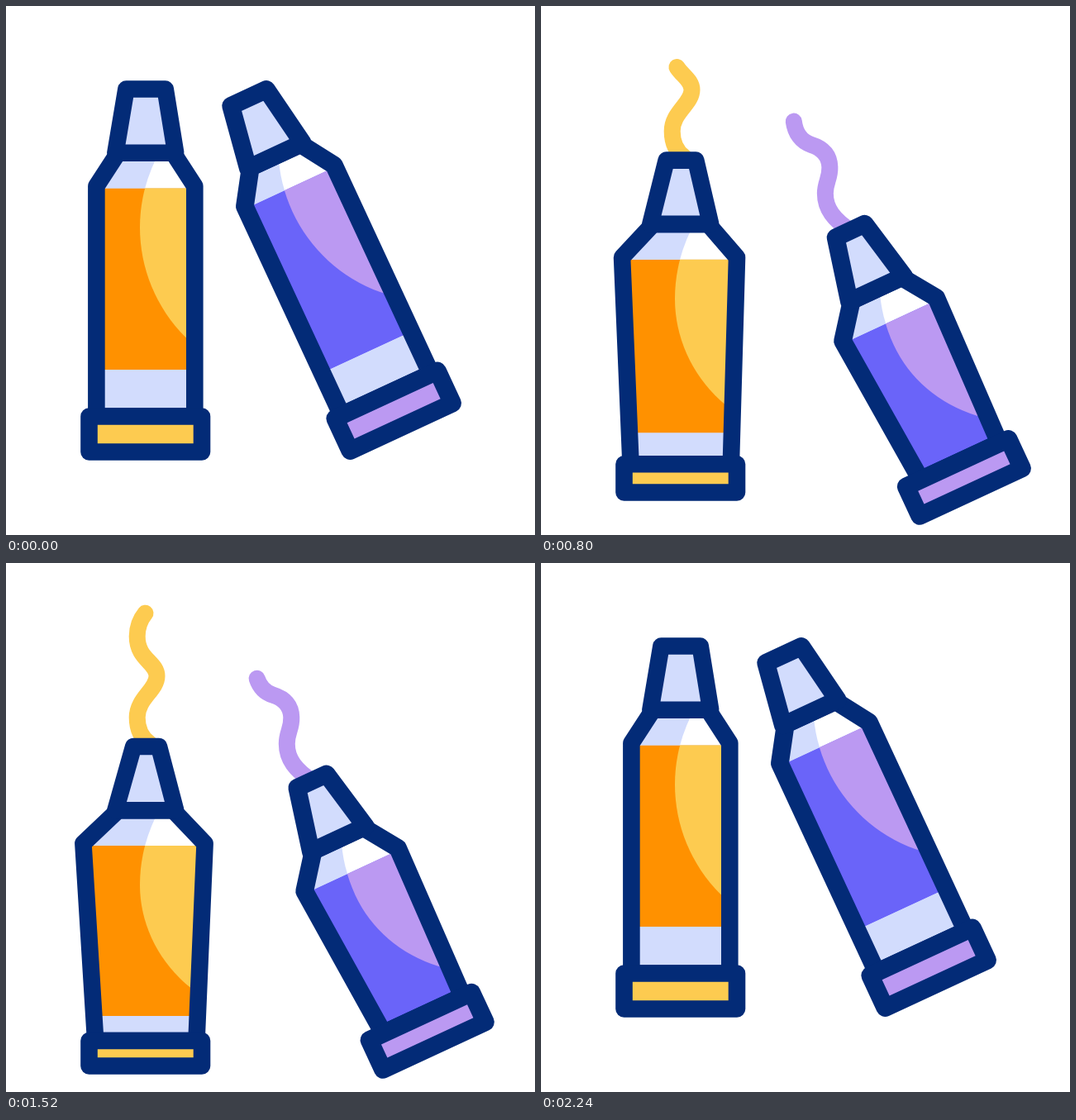
Write an HTML page with a canvas that moves like this. It is 640 by 640 pixels and loops after 2.4 s.

```html
<!DOCTYPE html>
<html lang="en">
<head>
<meta charset="utf-8">
<title>Paint tubes</title>
<style>
  html, body { margin: 0; width: 100%; height: 100%; overflow: hidden; background: #fff; }
  canvas { display: block; }
</style>
</head>
<body>
<canvas id="stage" width="640" height="640"></canvas>
<script>
const ctx = document.getElementById('stage').getContext('2d');
const LOOP = 2400;
const NAVY = '#032b77', PALE = '#d2dcfd';

// Offsets are the full travel of each part when the tube is squeezed.
const tubes = [
  {
    x: 169, y: 111, angle: 0, side: 0, line: 20.6,
    base: '#ff9100', light: '#fdcb50',
    rise: [390, 795], fall: [1612, 615],
    nozzle: 121.5, label: 108, footTop: 81.5, footBottom: 69,
    capTop: [8.8, -7.7], bodyTop: [-16, 12.3], bodyEnd: [-1.2, 2.2],
    shine: [349, 268, 187],
    thread: 'M5,7 C-5,0 -10.3,-11 -10.3,-25 C-10.3,-48 13.5,-58 13.5,-75 ' +
      'C13.5,-92 -10.3,-95 -10.3,-123 C-10.3,-134 -7,-143 -.5,-151'
  },
  {
    x: 298, y: 120.5, angle: -24.9 * Math.PI / 180, side: 5, line: 21.8,
    base: '#6a64f9', light: '#bb99f2',
    rise: [210, 750], fall: [1405, 615],
    nozzle: 187.5, label: 153, footTop: 97, footBottom: 93,
    capTop: [5, -4], bodyTop: [-4.5, 1.5], bodyEnd: [11, -3.5],
    shine: [346, 248, 187],
    thread: 'M6.5,10 C-15.5,-4 -25.5,-18 -25.5,-36 C-25.5,-50 -19.5,-54 -20,-68 ' +
      'C-20.5,-83 -29.5,-91 -42.5,-95 C-55.5,-99 -64,-112 -64,-130'
  }
];

for (const tube of tubes) {
  const path = document.createElementNS('http://www.w3.org/2000/svg', 'path');
  path.setAttribute('d', tube.thread);
  tube.length = path.getTotalLength();
  tube.path = new Path2D(tube.thread);
}

// Cubic bezier easing (.42, 0, .33, 1)
function ease(x) {
  if (x <= 0) return 0;
  if (x >= 1) return 1;
  let lo = 0, hi = 1;
  for (let i = 0; i < 24; i++) {
    const s = (lo + hi) / 2;
    if (1.26 * s * (1 - s) ** 2 + s * s < x) lo = s; else hi = s;
  }
  return lo * lo * (3 - 2 * lo);
}

const phase = (t, [start, span]) => ease((t - start) / span);

function polygon(points) {
  const path = new Path2D();
  points.forEach(([x, y]) => path.lineTo(x, y));
  path.closePath();
  return path;
}

function paint(path, fill) {
  ctx.fillStyle = fill;
  ctx.fill(path);
  ctx.stroke(path);
}

function drawThread(tube, p, top) {
  if (p < 0.01) return;
  ctx.save();
  ctx.translate(169, top);
  ctx.rotate(-tube.angle);
  ctx.strokeStyle = tube.light;
  ctx.lineWidth = 20;
  ctx.setLineDash([tube.length * p, tube.length * 2]);
  ctx.stroke(tube.path);
  ctx.restore();
}

function drawTube(tube, t) {
  const p = phase(t, tube.rise) - phase(t, tube.fall);
  const drop = tube.nozzle * p;
  const labelTop = 220.5 + drop, labelEnd = 440 + tube.label * p;
  const footTop = 496.5 + tube.footTop * p, footEnd = 539.5 + tube.footBottom * p;
  const pair = (left, right, [dl, dr]) => [left + dl * p, right + dr * p];
  const [capL, capR] = pair(145.4, 192.7, tube.capTop);
  const [topL, topR] = pair(109.4, 228.3, tube.bodyTop);
  const [endL, endR] = pair(109.4, 228.3, tube.bodyEnd);
  const [cx, cy, r] = tube.shine;

  const body = polygon([
    [135.6, 177.7 + drop], [202.2, 177.7 + drop], [topR, 217.8 + drop],
    [endR, footTop], [endL, footTop], [topL, 217.8 + drop]
  ]);
  const cap = polygon([
    [capL, 100.5 + drop], [capR, 100.5 + drop],
    [205.2, 177.7 + drop], [132.4, 177.7 + drop]
  ]);
  const foot = polygon([
    [100.5, footTop], [237, footTop], [237, footEnd], [100.5, footEnd]
  ]);
  const shine = new Path2D();
  shine.ellipse(cx, cy + drop, r, r, 0, Math.PI, 2 * Math.PI);
  shine.ellipse(cx, cy + drop, r, r * (1 - 0.1 * p), 0, 0, Math.PI);
  const label = new Path2D();
  label.rect(60, labelTop, 220, labelEnd - labelTop);

  ctx.save();
  ctx.translate(tube.x, tube.y);
  ctx.rotate(tube.angle);
  ctx.translate(tube.side * p - 169, -111);
  ctx.strokeStyle = NAVY;
  ctx.lineWidth = tube.line;
  ctx.lineJoin = ctx.lineCap = 'round';

  drawThread(tube, p, 90.3 + drop);

  ctx.save();
  ctx.clip(body);
  ctx.fillStyle = PALE;
  ctx.fill(body);
  ctx.save();
  ctx.beginPath();
  ctx.rect(60, 0, 220, labelTop);
  ctx.clip();
  ctx.fillStyle = '#fff';
  ctx.fill(shine);
  ctx.restore();
  ctx.clip(label);
  ctx.fillStyle = tube.base;
  ctx.fill(label);
  ctx.fillStyle = tube.light;
  ctx.fill(shine);
  ctx.restore();

  ctx.stroke(body);
  paint(cap, PALE);
  paint(foot, tube.light);
  ctx.restore();
}

const begin = performance.now();

function frame() {
  const t = (performance.now() - begin) % LOOP;
  ctx.fillStyle = '#fff';
  ctx.fillRect(0, 0, 640, 640);
  tubes.forEach(tube => drawTube(tube, t));
  requestAnimationFrame(frame);
}
frame();
</script>
</body>
</html>
```
